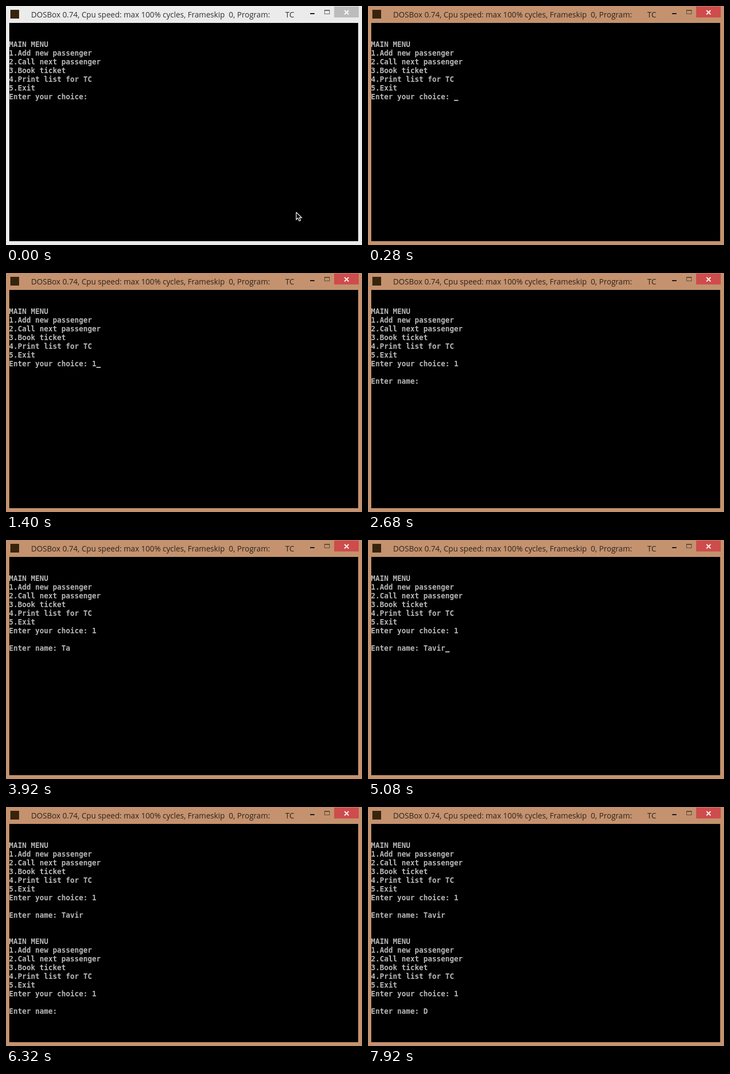
An HTML page with a canvas that plays this animation: 652 by 438 pixels, repeating every 8000 ms.

```html
<!DOCTYPE html>
<html lang="en">
<head>
<meta charset="utf-8">
<title>Passenger menu</title>
<style>
  html, body { margin: 0; width: 100%; height: 100%; overflow: hidden; background: #000; }
  canvas { display: block; }
</style>
</head>
<body>
<canvas id="stage" width="652" height="438"></canvas>
<script>
const ctx = document.getElementById('stage').getContext('2d');
const LOOP = 8000, BLINK = 200;
const LEFT = 5.5, TOP = 31, CELL_W = 8, CELL_H = 16;
const TEXT_COLOR = '#b8b8b8';

const MENU = `

MAIN MENU
1.Add new passenger
2.Call next passenger
3.Book ticket
4.Print list for TC
5.Exit
Enter your choice: `;
const NAME = '\n\nEnter name: ';

// Terminal output and key presses: [time in ms, text]
const SCRIPT = [
  [0, MENU], [1120, '1'], [2680, NAME],
  [3280, 'T'], [3720, 'a'], [4160, 'v'], [4640, 'i'], [4880, 'r'],
  [5320, '\n' + MENU], [5880, '1'], [6200, NAME], [7480, 'D']
];

// Colours of the window without and with focus
const THEME = {
  frame: [[235, 235, 235], [196, 146, 110]],
  title: [[48, 48, 48], [44, 34, 28]],
  maximize: [[104, 104, 104], [96, 74, 56]],
  close: [[188, 188, 188], [206, 76, 76]]
};

function mix([a, b], k) {
  return `rgb(${a.map((v, i) => Math.round(v + (b[i] - v) * k))})`;
}

function rect(color, x, y, w, h) {
  ctx.fillStyle = color;
  ctx.fillRect(x, y, w, h);
}

function path(points, color, width) {
  ctx.beginPath();
  points.forEach(([x, y]) => ctx.lineTo(x, y));
  ctx.strokeStyle = color;
  ctx.lineWidth = width;
  ctx.stroke();
}

function drawWindow(focus) {
  const color = key => mix(THEME[key], focus);
  rect(color('frame'), 0, 0, 652, 438);
  rect('#000', 6, TOP, 639, 400);
  rect('#38240c', 8, 7, 16, 16);

  ctx.fillStyle = color('title');
  ctx.font = '14.1px "Open Sans", sans-serif';
  ctx.fillText('DOSBox 0.74, Cpu speed: max 100% cycles, Frameskip  0, Program:', 46, 21);
  ctx.fillText('TC', 511.5, 21);

  rect('#181818', 557, 13, 8, 2);
  ctx.strokeStyle = color('maximize');
  ctx.lineWidth = 1;
  ctx.strokeRect(583.5, 7.5, 9, 7);
  rect(color('maximize'), 583, 8, 10, 1);

  rect(color('close'), 601, 1, 45, 20);
  path([[620, 8], [627.5, 15.5]], '#fff', 1.8);
  path([[627.5, 8], [620, 15.5]], '#fff', 1.8);
}

function drawTerminal(t) {
  const text = SCRIPT.filter(([at]) => at <= t).map(([, s]) => s).join('');
  let col = 0, row = 0;
  ctx.fillStyle = TEXT_COLOR;
  ctx.font = 'bold 13.29px "DejaVu Sans Mono", monospace';
  for (const ch of text) {
    if (ch === '\n') {
      col = 0;
      row++;
    } else {
      ctx.fillText(ch, LEFT + col++ * CELL_W, TOP + row * CELL_H + 12);
    }
  }
  const printing = t >= 2680 && t < 2720;
  const lit = Math.floor((t + 2 * BLINK - 100) / BLINK) % 2 === 0;
  if (lit && !printing) {
    rect(TEXT_COLOR, LEFT + col * CELL_W, TOP + row * CELL_H + 13, CELL_W, 2);
  }
}

function drawPointer() {
  const outline = [[0, 0], [0, 13.5], [3, 10.5], [5.5, 16], [8, 15], [5.7, 9.8], [10, 9.8], [0, 0]];
  path(outline.map(([x, y]) => [x + 531.5, y + 378]), '#fff', 1.2);
}

function draw(now) {
  const t = now % LOOP;
  drawWindow(Math.min(1, Math.max(0, (t - 30) / 120)));
  drawTerminal(t);
  if (t < 40) drawPointer();
  requestAnimationFrame(draw);
}
requestAnimationFrame(draw);
</script>
</body>
</html>
```
